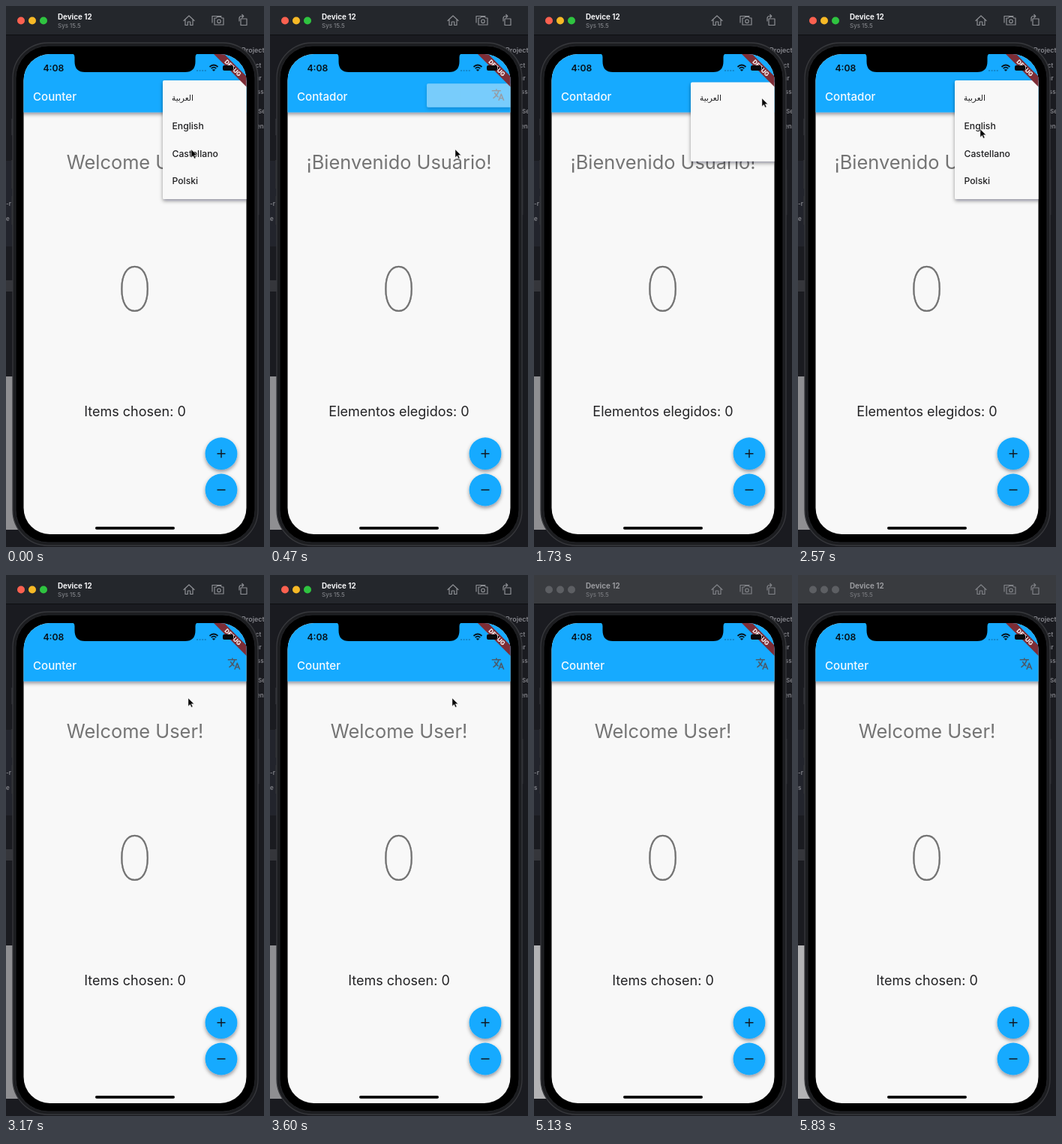
These frames come from a looping animation (344x720 px, 5860 ms). An HTML page:

```html
<!DOCTYPE html>
<html lang="en">
<head>
<meta charset="utf-8">
<title>Counter</title>
<style>
  html, body { margin: 0; width: 100%; height: 100%; overflow: hidden; background: #1a1b20; }
  svg { display: block; width: 100%; height: 100%; }
  text { font-family: Inter, "Open Sans", sans-serif; font-optical-sizing: none; }
  .mid { text-anchor: middle; }
  .line { fill: none; stroke-linecap: round; stroke-linejoin: round; }
  .side { font-size: 8px; font-weight: 600; fill: #85868c; }
  .item { font-size: 12.2px; font-weight: 500; fill: #202022; }
</style>
</head>
<body>
<svg viewBox="0 0 344 720" xmlns="http://www.w3.org/2000/svg">
  <defs>
    <clipPath id="screenClip"><rect x="23.500" y="64" width="297" height="639" rx="35"/></clipPath>
    <clipPath id="menuClip"><rect id="menuWindow" x="209" y="99" width="112" height="158"/></clipPath>
    <filter id="soft" x="-30%" y="-30%" width="160%" height="160%">
      <feDropShadow dx="0" dy="2.5" stdDeviation="2.5" flood-color="#101014" flood-opacity=".42"/>
    </filter>
  </defs>

  <!-- desktop behind the device -->
  <rect width="344" height="720" fill="#1a1b20"/>
  <rect y="206" width="9" height="114" fill="#22242c"/>
  <rect y="365" width="9" height="15" fill="#35363b"/>
  <rect id="pale" y="493" width="24" height="204"/>
  <g class="side">
    <text x="314" y="62" font-size="9">Project</text>
    <text x="328" y="82">ect</text>
    <text x="333" y="99">ar</text>
    <text x="330" y="117">oss</text>
    <text x="336" y="143">Se</text>
    <text x="334" y="163">en</text>
    <text x="0" y="266">-r</text>
    <text x="0" y="286" id="sideLetter">e</text>
  </g>

  <!-- window bar -->
  <rect id="bar" width="344" height="38"/>
  <rect y="38" width="344" height="1" fill="#0e0f12"/>
  <g id="lights">
    <circle cx="20" cy="19.5" r="5"/><circle cx="35" cy="19.5" r="5"/><circle cx="50" cy="19.5" r="5"/>
  </g>
  <text id="device" x="69" y="18" font-size="9.8" font-weight="700">Device 12</text>
  <text id="system" x="69" y="29" font-size="8">Sys 15.5</text>
  <g id="tools" class="line" stroke-width="1.2">
    <path d="M237 19.5l7-6.5 7 6.5M239 18.500v7h3.300v-4.500h3.400v4.500h3.300v-7"/>
    <path d="M275 22v-8.500h12M278 16h2.500l1.200-1.700h4.600l1.200 1.700h2.500v9h-12z"/>
    <circle cx="284" cy="20.300" r="2.300"/>
    <path d="M313 17h8v8.500h-8zM311 20v-3.500q0-3 3-3h2.500m-1.700-2l2 2-2 2"/>
  </g>

  <!-- device body -->
  <g fill="#2b2c31">
    <rect x="7" y="150" width="3" height="22"/><rect x="7" y="205" width="3" height="38"/>
    <rect x="7" y="253" width="3" height="38"/><rect x="334.500" y="218" width="3" height="60"/>
  </g>
  <rect x="9" y="49" width="327" height="669" rx="47" fill="#1c1d20" stroke="#37383c" stroke-width="1.300"/>
  <rect x="13" y="53" width="319" height="661" rx="43" fill="#000" stroke="#232428"/>

  <g clip-path="url(#screenClip)">
    <rect x="23" y="64" width="298" height="639" fill="#f8f8f8"/>
    <text id="welcome" class="mid" x="172" y="217" font-size="25.400" fill="#747474"/>
    <text class="mid" x="171.700" y="406" font-size="81.500" font-weight="100" fill="#707070" stroke="#707070" stroke-width=".4">0</text>
    <text id="chosen" class="mid" x="172" y="546" font-size="18" fill="#222224"/>
    <rect x="20" y="60" width="305" height="81.500" fill="#16aaff" filter="url(#soft)"/>
    <text id="title" x="36" y="126" font-size="15.100" font-weight="500" fill="#f6fbff"/>
    <g class="line" transform="translate(295 109) scale(.76)" stroke="#4a5a6a" stroke-width="2.100" style="stroke-linecap:butt">
      <path d="M1 5h16M9 2v3M13.200 5Q11 13 3.300 18.300M5.700 8Q8 13 12.500 16.300"/>
      <path d="M13 22l4.500-11 4.500 11M14.800 18h5.400"/>
    </g>
    <g fill="#16aaff" filter="url(#soft)">
      <circle cx="287" cy="595.700" r="21.400"/><circle cx="287" cy="644" r="21.400"/>
    </g>
    <path d="M281.500 595.700h11M287 590.200v11M281.500 644h11" stroke="#101a24" stroke-width="1.500"/>

    <g id="menu">
      <rect id="menuBox" x="209" width="115" rx="2" fill="#f8f8f8" filter="url(#soft)"/>
      <g id="items" clip-path="url(#menuClip)">
        <text class="item" x="221" y="126" style="font-family:'DejaVu Sans',sans-serif;font-size:10.600px;font-weight:400">العربية</text>
        <text class="item" x="221.500" y="164.300">English</text>
        <text class="item" x="221.500" y="200.800">Castellano</text>
        <text class="item" x="221.500" y="237">Polski</text>
      </g>
    </g>

    <g transform="translate(321 64) rotate(45)">
      <rect x="-33" y="21.200" width="66" height="9.900" fill="#7d2d36"/>
      <text class="mid" y="29" font-size="8" font-weight="800" fill="#f6f0f0">DEBUG</text>
    </g>

    <!-- status bar -->
    <text x="49.500" y="87" font-size="12.200" font-weight="600" fill="#061018">4:08</text>
    <path d="M254 86h13" stroke="#127cbb" stroke-width="1.600" stroke-dasharray="2 1.600"/>
    <g class="line" stroke="#061018" stroke-width="1.700" style="stroke-linecap:butt">
      <path d="M271.500 81q5.500-5 11 0M273.700 83.200q3.300-3 6.600 0"/>
      <path d="M277 86.500l-1.600-1.700h3.200z" stroke-width=".8" fill="#061018"/>
    </g>
    <rect x="289" y="79" width="14" height="7" rx="2" fill="#08090c"/>
    <rect x="304" y="81" width="1.300" height="3" fill="#08090c"/>
    <path d="M86 63q5.500 0 5.500 5v6q0 14 14 14h133q14 0 14-14v-6q0-5 5.500-5z"/>
    <rect x="119" y="693" width="106" height="3.700" rx="1.850"/>
  </g>

  <path id="cursor" d="M0 0v10.500l2.500-2.300 1.700 3.800 1.700-.8-1.700-3.600h3.400z" fill="#050505" stroke="#d9d9d9" stroke-width=".5"/>
</svg>
<script>
const LOOP = 5860, MENU_TIME = 300, CLOSE_DELAY = 100, CLOSE_TIME = 200, BLUR_AT = 5070;
const PICK_SPANISH = 200, OPEN_MENU = 1586, PICK_ENGLISH = 2830;
const EN = ["Counter", "Welcome User!", "Items chosen: 0"];
const ES = ["Contador", "¡Bienvenido Usuario!", "Elementos elegidos: 0"];
const FOCUSED = { bar: "#24272c", lights: ["#fb6150", "#f7b926", "#2fc440"], name: "#f4f4f6", dim: "#8d8f94", pale: "#8f8f92" };
const BLURRED = { bar: "#393b3f", lights: ["#5d5f63", "#5d5f63", "#5d5f63"], name: "#9a9b9f", dim: "#808287", pale: "#b3b3b5" };
// time, x, y of the pointer tip
const POINTER = [[0, 247, 191], [480, 247, 191], [1000, 301, 130], [1400, 301, 130], [1600, 304, 123],
  [1930, 304, 123], [2420, 243, 164], [4200, 243, 164], [4480, -12, 250]];

const $ = id => document.getElementById(id);
const clamp = v => Math.max(0, Math.min(1, v));
const smooth = v => v * v * (3 - 2 * v);

function menuProgress(t) {
  const closing = picked => clamp(1 - (t - picked - CLOSE_DELAY) / CLOSE_TIME);
  if (t < OPEN_MENU) return closing(PICK_SPANISH);
  if (t < PICK_ENGLISH) return clamp((t - OPEN_MENU) / MENU_TIME);
  return closing(PICK_ENGLISH);
}

function drawMenu(p) {
  const top = 99 + 5 * (1 - p), height = 158 * clamp(p / 0.727);
  $("menu").setAttribute("opacity", clamp(p * 3));
  for (const id of ["menuBox", "menuWindow"]) {
    $(id).setAttribute("y", top);
    $(id).setAttribute("height", height);
  }
  [...$("items").children].forEach((item, i) =>
    item.setAttribute("opacity", clamp((p - 0.32 - 0.17 * i) / 0.16)));
}

function drawPointer(t) {
  const i = POINTER.findIndex(k => k[0] > t);
  $("cursor").style.display = i < 0 ? "none" : "";
  if (i < 0) return;
  const [t0, x0, y0] = POINTER[i - 1], [t1, x1, y1] = POINTER[i];
  const f = smooth((t - t0) / (t1 - t0));
  $("cursor").setAttribute("transform", `translate(${x0 + (x1 - x0) * f} ${y0 + (y1 - y0) * f})`);
}

function drawWindow(theme, letter) {
  const fill = (id, color) => $(id).setAttribute("fill", color);
  fill("bar", theme.bar);
  fill("device", theme.name);
  fill("system", theme.dim);
  fill("pale", theme.pale);
  $("tools").setAttribute("stroke", theme.dim);
  [...$("lights").children].forEach((dot, i) => dot.setAttribute("fill", theme.lights[i]));
  $("sideLetter").textContent = letter;
}

function render(t) {
  const words = t >= PICK_SPANISH && t < PICK_ENGLISH ? ES : EN;
  ["title", "welcome", "chosen"].forEach((id, i) => $(id).textContent = words[i]);
  drawMenu(menuProgress(t));
  drawPointer(t);
  if (t < BLUR_AT) drawWindow(FOCUSED, "e");
  else drawWindow(BLURRED, "s");
}

const start = performance.now();
function tick() {
  render((performance.now() - start) % LOOP);
  requestAnimationFrame(tick);
}
tick();
</script>
</body>
</html>
```
